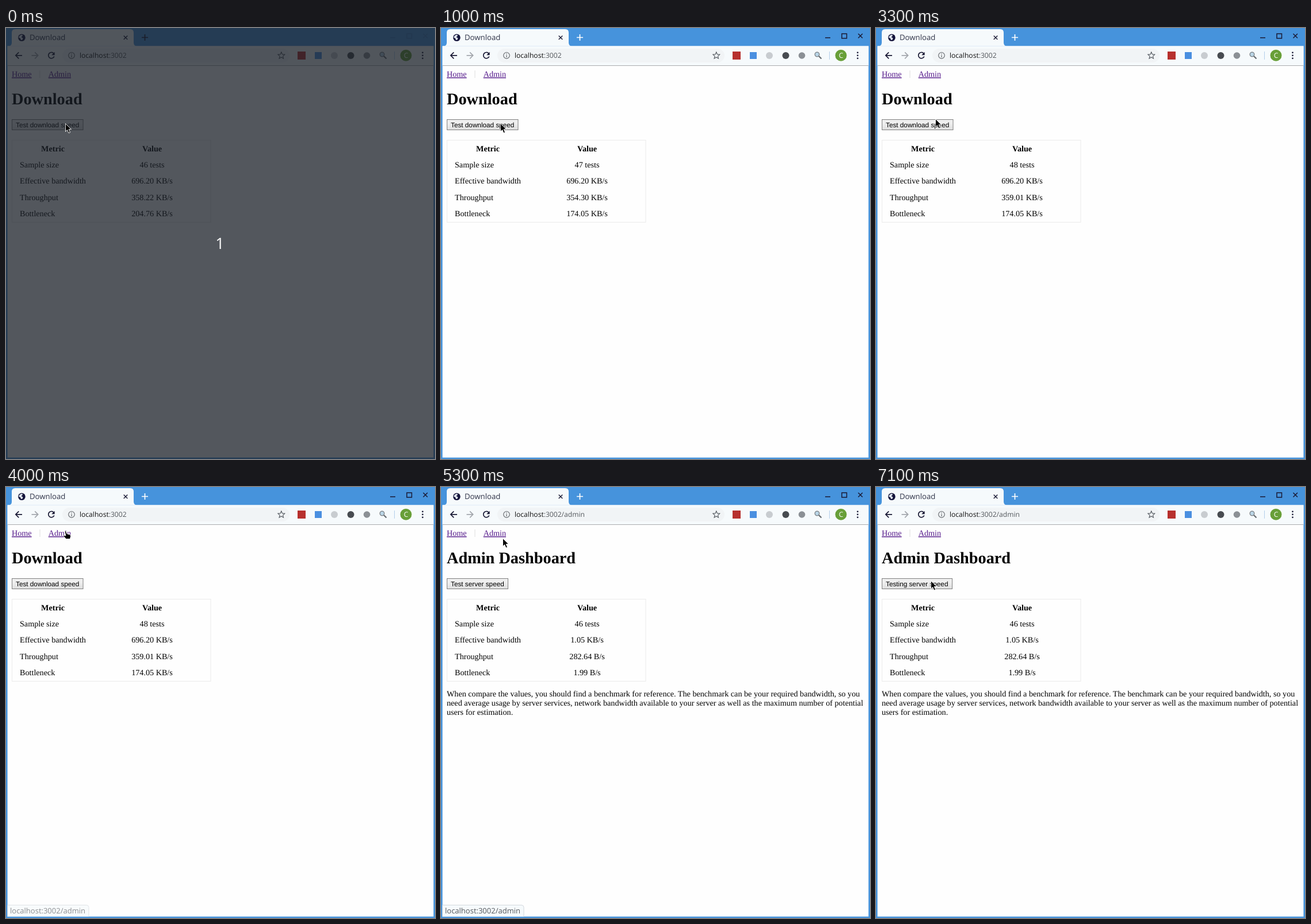
An HTML page that plays this animation: 746x751 px, repeating every 8000 ms.

```html
<!DOCTYPE html>
<html lang="en">
<head>
<meta charset="utf-8">
<title>Download</title>
<style>
  html, body { margin: 0; width: 100%; height: 100%; overflow: hidden; background: #4693dc; }
  svg { display: block; width: 746px; height: 751px; }
  text { text-rendering: geometricPrecision; white-space: pre; }
  .page { font: 14.165px "Liberation Serif", serif; }
  .bold { font-weight: bold; }
  .mid { text-anchor: middle; }
  .ui { font: 12.1px "Open Sans", sans-serif; fill: #53575c; }
  .link { fill: #551a8b; text-decoration: underline; }
  .line { fill: none; stroke: #1a1a35; stroke-width: 1.7; }
</style>
</head>
<body>
<svg viewBox="0 0 746 751">
  <defs>
    <linearGradient id="normal" x2="0" y2="1">
      <stop offset=".38" stop-color="#efefef"/><stop offset="1" stop-color="#dedede"/>
    </linearGradient>
    <linearGradient id="pressed" x2="0" y2="1">
      <stop offset="0" stop-color="#d6d6d6"/><stop offset="1" stop-color="#ececec"/>
    </linearGradient>
  </defs>

  <!-- window frame and tab -->
  <rect width="746" height="751" fill="#4693dc"/>
  <rect x="2.600" y="31.500" width="740.800" height="717" fill="#fefefe"/>
  <path d="M4 31.500q6 0 6-6V8q0-6 6-6H216q6 0 6 6V25.500q0 6 6 6z" fill="#f6fafc"/>
  <rect x="2.600" y="31.500" width="740.800" height="34" fill="#f6fafc"/>
  <path d="M2.600 65.500H743.400" stroke="#aaacae"/>
  <circle cx="27.4" cy="16.8" r="6.3" fill="#12123a"/>
  <path d="M24 13l4-1.500 1 2-2.500 2.500 3 1.500-1 3-2.500.5-1-3-3-1.500z" fill="#dfe5ee"/>
  <text class="ui" x="41" y="21" style="font-size:13.2px;fill:#2f3348">Download</text>
  <path class="line" d="M204.700 13.500l6.600 6.600m0-6.600l-6.600 6.600" style="stroke-width:1.4"/>
  <path class="line" id="plus" d="M236 16.500h11m-5.500-5.500v11"/>
  <path class="line" id="controls" style="stroke-width:1.5"
    d="M668 17H677M697 10h8.500v8h-8.500zM725.500 10l7.500 7.500m0-7.500l-7.500 7.500"/>

  <!-- toolbar -->
  <rect x="98" y="36" width="395" height="24" rx="12" fill="#f1f4f6"/>
  <path class="line" d="M28 47.800H17M22.300 42.300L16.800 47.800l5.500 5.500"/>
  <path class="line" d="M44.500 47.800h11M50.200 42.300l5.500 5.500-5.500 5.500" style="stroke:#a3a7ad"/>
  <path class="line" d="M82.800 44.200A5.200 5.200 0 1 0 83.800 49.500"/>
  <path d="M84.600 41.800v5.400h-5.400z" fill="#1a1a35"/>
  <circle class="line" cx="114" cy="47.800" r="5.300" style="stroke:#5f6368;stroke-width:1.1"/>
  <path class="line" d="M114 44.500v1.400m0 1.300v3.900" style="stroke:#5f6368;stroke-width:1.2"/>
  <text class="ui" x="128" y="52"><tspan fill="#111">localhost</tspan>:3002<tspan id="path"></tspan></text>
  <path class="line" d="M478.800 42l1.700 3.900 4.200.4-3.200 2.800 1 4.100-3.700-2.200-3.700 2.200 1-4.100-3.200-2.800 4.200-.4z" style="stroke:#50555c;stroke-width:1.1"/>
  <rect x="507" y="41" width="14" height="14" fill="#b7302e"/>
  <rect x="537" y="42" width="12" height="12" fill="#4a8fe0"/>
  <circle cx="571" cy="48" r="6" fill="#c8ccd0"/>
  <circle cx="599.500" cy="48" r="6" fill="#474b50"/>
  <circle cx="627.500" cy="48" r="5.800" fill="#8b9095"/>
  <circle cx="654" cy="46" r="3.800" fill="#b9d5e6" stroke="#777c82" stroke-width="1.3"/>
  <path d="M657 49l4.500 4.500" stroke="#666b70" stroke-width="2.200"/>
  <path d="M675.500 41v14" stroke="#b3cfea"/>
  <circle cx="695.500" cy="47.800" r="10" fill="#689f38"/>
  <text class="ui mid" x="695.500" y="52" style="fill:#fff">C</text>
  <path d="M724.500 42.800v.01m0 5v.01m0 5v.01" stroke="#1a1a35" stroke-width="2.800" stroke-linecap="round"/>

  <!-- page -->
  <g class="page">
    <text class="link" x="10" y="85">Home</text>
    <path d="M59 74v13" stroke="#ddd"/>
    <text class="link" id="admin" x="73.700" y="85">Admin</text>
    <text class="bold" id="heading" x="10" y="133" font-size="28.300"></text>
    <rect id="button" x="10.500" y="159.500" height="18"/>
    <text id="label" x="17" y="172.500" style="font:11.75px 'Liberation Sans',sans-serif"></text>
    <rect x="10.500" y="195.500" width="345.500" height="143" fill="none" stroke="#ebebeb"/>
    <text class="bold mid" x="81.500" y="215">Metric</text>
    <text class="bold mid" x="254" y="215">Value</text>
    <g id="rows"></g>
    <g id="note">
      <text x="10" y="365">When compare the values, you should find a benchmark for reference. The benchmark can be your required bandwidth, so you</text>
      <text x="10" y="381">need average usage by server services, network bandwidth available to your server as well as the maximum number of potential</text>
      <text x="10" y="397">users for estimation.</text>
    </g>
  </g>
  <g id="status">
    <path d="M2.500 748.500V728.500H140q4 0 4 4V748.500" fill="#f6fafc" stroke="#d3d8dd"/>
    <text class="ui" x="7" y="743" style="font-size:13px">localhost:3002/admin</text>
  </g>

  <g id="countdown">
    <rect width="746" height="751" fill="#1a1f27" opacity=".75"/>
    <text class="ui mid" x="372" y="385" style="font-size:27px;fill:#fff">1</text>
  </g>
  <g id="cursor" stroke="#fff" stroke-width=".9" stroke-linejoin="round">
    <path id="arrow" d="M.5.5V14.500L3.600 11.500 6 17 8.500 16 6.200 10.600H10.500z"/>
    <path id="hand" d="M-2 0q1.500-1 2.500.5L2 4.500 7 6q1.500.5 1.500 2L7.500 13.500H.5L-4 8.500q0-2 2-1L0 8z"/>
  </g>
</svg>
<script>
const $ = id => document.getElementById(id);
const show = (id, visible) => $(id).style.display = visible ? "" : "none";

// [start, tests, bandwidth, throughput, bottleneck]
const results = [
  [0, 46, "696.20 KB/s", "358.22 KB/s", "204.76 KB/s"],
  [1000, 47, "696.20 KB/s", "354.30 KB/s", "174.05 KB/s"],
  [2200, 48, "696.20 KB/s", "359.01 KB/s", "174.05 KB/s"],
  [4500, 0, "0", "0", "0"],
  [4600, 46, "1.05 KB/s", "282.64 B/s", "1.99 B/s"]
];

// [time, x, y]
const pointer = [
  [0, 103, 166], [2600, 103, 166], [2700, 103, 165], [3000, 103, 165], [3300, 103, 158],
  [3500, 103, 131], [3700, 103, 94], [3900, 104, 77], [5100, 104, 77], [5300, 107, 89],
  [5600, 125, 127], [5800, 130, 141], [6000, 116, 157], [6200, 101, 163], [6400, 95, 164],
  [7000, 95, 164], [7100, 95, 163], [8000, 95, 163]
];

const values = ["Sample size", "Effective bandwidth", "Throughput", "Bottleneck"].map((name, i) => {
  const y = 243.2 + i * 28.25;
  $("rows").insertAdjacentHTML("beforeend",
    `<text x="24" y="${y}">${name}</text><text class="mid" x="254" y="${y}"></text>`);
  return $("rows").lastElementChild;
});

const clamp = v => Math.max(0, Math.min(1, v));
const within = (t, from, to) => t >= from && t < to;

function pointerAt(t) {
  const i = Math.max(1, pointer.findIndex(p => p[0] >= t));
  const [t0, x0, y0] = pointer[i - 1], [t1, x1, y1] = pointer[i];
  const k = (t - t0) / (t1 - t0);
  return [Math.round(x0 + (x1 - x0) * k), Math.round(y0 + (y1 - y0) * k)];
}

function draw(t) {
  const focused = t >= 800, admin = t >= 4500, testing = t >= 6800;
  const pressed = within(t, 900, 1000) || within(t, 2000, 2200) || within(t, 6700, 6800);
  const onLink = within(t, 3800, 5300);

  show("countdown", t < 100);
  show("note", admin);
  show("hand", onLink);
  show("arrow", !onLink);
  $("controls").style.opacity = focused ? 1 : t < 100 ? .15 : .45;
  $("plus").style.stroke = focused ? "#fff" : "";
  $("path").textContent = admin ? "/admin" : "";
  $("heading").textContent = admin ? "Admin Dashboard" : "Download";
  $("admin").style.fill = within(t, 4300, 4500) ? "#e00" : "";

  $("label").textContent = testing ? "Testing server speed" : admin ? "Test server speed" : "Test download speed";
  $("button").setAttribute("width", testing ? 122 : admin ? 106 : 123.5);
  $("button").setAttribute("fill", pressed ? "url(#pressed)" : "url(#normal)");
  $("button").setAttribute("stroke", pressed ? "#999" : "#808080");

  const [, tests, ...rates] = results.findLast(r => t >= r[0]);
  [tests + " tests", ...rates].forEach((v, i) => values[i].textContent = v);

  $("status").style.opacity = clamp((t - 3800) / 300) * clamp((5700 - t) / 200);
  $("cursor").setAttribute("transform", `translate(${pointerAt(t)})`);
}

function tick() {
  draw(Math.floor(performance.now() % 8000 / 100) * 100);
  requestAnimationFrame(tick);
}
tick();
</script>
</body>
</html>
```
